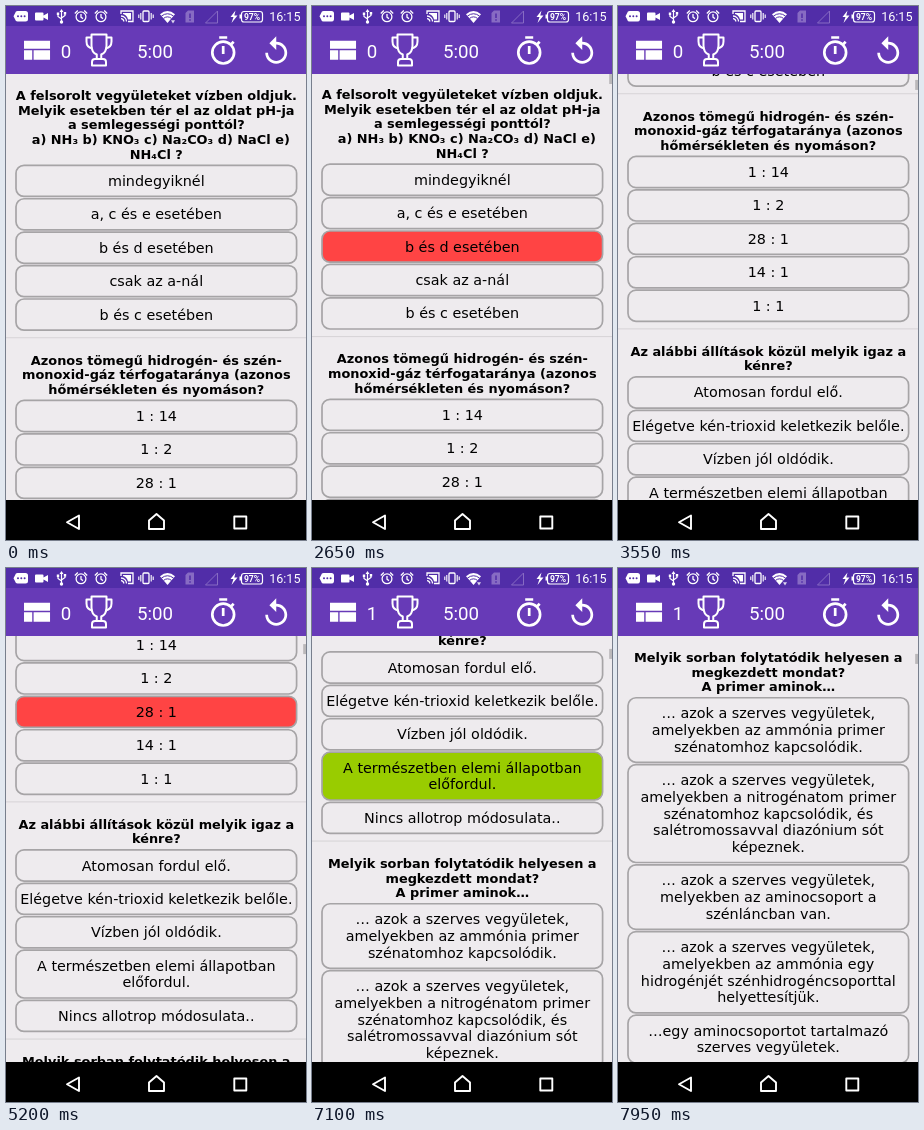
Recreate the animation shown at these times as an HTML page. Size 300 px wide and 534 px high, loop 8 s.

```html
<!DOCTYPE html>
<html lang="hu">
<head>
<meta charset="utf-8">
<title>Kémia kvíz</title>
<style>
  html, body { margin: 0; width: 100%; height: 100%; overflow: hidden; background: #000; }
  svg { display: block; width: 100%; height: 100%; }
  .title { font: bold 12.9px "DejaVu Sans", sans-serif; text-anchor: middle; }
  .answer { font: 14.35px "DejaVu Sans", sans-serif; text-anchor: middle; }
  .box { stroke: #a6a4a6; stroke-width: 1.7; }
  .bar { font-family: Roboto, sans-serif; fill: #fff; }
  .line { fill: none; stroke: #fff; }
</style>
</head>
<body>
<svg viewBox="0 0 300 534">
  <defs>
    <clipPath id="view"><rect y="68" width="300" height="426"/></clipPath>
    <g id="alarm" class="line" stroke-width="1.3">
      <circle r="4.9"/>
      <path d="M0 -2.8V.4L2 1.8M-6.2 -3.4L-3.2 -6.2M6.2 -3.4L3.2 -6.2"/>
    </g>
  </defs>

  <rect y="68" width="300" height="426" fill="#eeebee"/>
  <g clip-path="url(#view)">
    <g id="list"></g>
    <rect id="thumb" x="297.2" width="2.8" height="10" fill="#000"/>
  </g>

  <rect width="300" height="21" fill="#512da8"/>
  <rect y="20" width="300" height="48" fill="#673ab7"/>
  <rect y="494" width="300" height="40"/>

  <!-- status bar -->
  <path d="M11.500 5h8q2.500 0 2.500 2.500v5.500q0 2.500-2.500 2.500h-8q-2 0-2.300-2l-1.700-3.250 1.700-3.250q.300-2 2.300-2z" fill="#fff"/>
  <g fill="#512da8"><circle cx="12" cy="10.300" r="1"/><circle cx="15.300" cy="10.300" r="1"/><circle cx="18.600" cy="10.300" r="1"/></g>
  <path d="M30 6.500h6.500q1 0 1 1v2l4.500-2.500v7l-4.500-2.500v2q0 1-1 1H30q-1 0-1-1v-6q0-1 1-1z" fill="#fff"/>
  <g class="line" stroke-width="1.2"><path d="M55.500 5v11M52 8v2.500l3.500 2.500M59 7.500v2l-3.500 2.500"/></g>
  <path d="M55.500 3l2 3h-4zM50.800 6.500h2.400v2.400h-2.400zM57.800 6h2.400v2.400h-2.400z" fill="#fff"/>
  <circle cx="55.500" cy="16" r="1.700" fill="#fff"/>
  <use href="#alarm" x="75" y="10.800"/>
  <use href="#alarm" x="95" y="10.800"/>
  <g class="line" stroke-width="1.3">
    <path d="M115 8V5h12v10.500h-5M115 10a5.500 5.500 0 0 1 5.500 5.500M115 12.700a2.800 2.800 0 0 1 2.800 2.800"/>
    <path d="M117 7h8v6.500h-3q-1-4.500-5-5.500z" fill="#fff" stroke="none"/>
    <rect x="137" y="5" width="6" height="10.500" rx="1"/>
    <path d="M134.800 7v6.500M145.200 7v6.500M132.800 8.500v3.500M147.200 8.500v3.500" stroke-width="1.100"/>
  </g>
  <path d="M154 8.200Q161.500 1.800 169 8.200L161.500 17z" fill="#fff"/>
  <path d="M155.500 10Q161.500 5.500 167.500 10M157.500 12.400Q161.500 9.300 165.500 12.400" class="line" style="stroke:#512da8" stroke-width="1"/>
  <path id="data" d="M165 14.200h4l-2 3.300z" fill="#fff"/>
  <path d="M182 4.500h6v12h-8.500V7z" fill="#876bc3"/>
  <path d="M184 7.500v4.500M184 13.300v1.500" stroke="#512da8" stroke-width="1.500"/>
  <path d="M211.500 5v12h-12z" fill="none" stroke="#876bc3"/>
  <path d="M229.500 4.500l-5 6.500h3l-2 6 6-7.500h-3.200z" fill="#fff"/>
  <rect x="235.500" y="5.500" width="21" height="10.500" rx="2.500" class="line" stroke-width="1.200"/>
  <rect x="233.500" y="8.500" width="2" height="4" fill="#fff"/>
  <text class="bar" x="246" y="13.900" font-size="8.600" font-weight="700" text-anchor="middle">97%</text>
  <text class="bar" x="294.500" y="15.200" font-size="12.600" text-anchor="end">16:15</text>

  <!-- toolbar -->
  <path transform="translate(13.900 27.800) scale(1.370)" fill="#fff" d="M3 19h6v-7H3zM10 19h12v-7H10zM3 5v6h19V5z"/>
  <text id="score" class="bar" x="60" y="51.500" font-size="18.700" text-anchor="middle">0</text>
  <g class="line" stroke-width="2" stroke-linejoin="round">
    <path d="M85.500 28.500h15v11q0 7-5.250 9v4.500h-4.500v-4.500q-5.250-2-5.250-9z"/>
    <path d="M85.500 31.500h-5v4q0 6 6 7M100.500 31.500h5v4q0 6-6 7"/>
    <path d="M86 59.500v-3.500q0-3 3-3h8q3 0 3 3v3.500z"/>
  </g>
  <text class="bar" x="149" y="51.500" font-size="18.700" text-anchor="middle">5:00</text>
  <g class="line" transform="translate(.200 -.500)">
    <circle cx="217" cy="47.100" r="10.900" stroke-width="2.700"/>
    <path d="M217 40.500v8M213 32h8M224.500 39.200l3-3" stroke-width="2.700"/>
  </g>
  <path transform="translate(253.800 29) scale(1.370)" fill="#fff" d="M12 5V1L7 6l5 5V7c3.310 0 6 2.690 6 6s-2.690 6-6 6-6-2.690-6-6H4c0 4.420 3.580 8 8 8s8-3.580 8-8-3.580-8-8-8z"/>

  <!-- navigation -->
  <g class="line" stroke-width="1.900" stroke-linejoin="round">
    <path d="M73 509.500v13.500l-12-6.750z"/>
    <path d="M143 523v-8.500l7.500-6.500 7.500 6.500v8.500z"/>
    <rect x="228.300" y="510.500" width="12" height="12"/>
  </g>
</svg>
<script>
const LOOP = 8000, STEP = 50;
const PLAIN = [238, 235, 238], RED = [255, 68, 68], GREEN = [153, 204, 0];
const TITLE_LINE = 14.7, ANSWER_LINE = 16.7;

// Lines are separated by "|"; "mark" is the answer that gets tapped.
const questions = [
  { title: "A felsorolt vegyületeket vízben oldjuk.|Melyik esetekben tér el az oldat pH-ja|a semlegességi ponttól?|\u00a0\u00a0a) NH₃ b) KNO₃ c) Na₂CO₃ d) NaCl e)|NH₄Cl ?",
    answers: ["mindegyiknél", "a, c és e esetében", "b és d esetében", "csak az a-nál", "b és c esetében"],
    mark: 2, color: RED, tap: 1850 },
  { title: "Azonos tömegű hidrogén- és szén-|monoxid-gáz térfogataránya (azonos|hőmérsékleten és nyomáson?",
    answers: ["1 : 14", "1 : 2", "28 : 1", "14 : 1", "1 : 1"],
    mark: 2, color: RED, tap: 4550 },
  { title: "Az alábbi állítások közül melyik igaz a|kénre?",
    answers: ["Atomosan fordul elő.", "Elégetve kén-trioxid keletkezik belőle.", "Vízben jól oldódik.",
      "A természetben elemi állapotban|előfordul.", "Nincs allotrop módosulata.."],
    mark: 3, color: GREEN, tap: 6450 },
  { title: "Melyik sorban folytatódik helyesen a|megkezdett mondat?|A primer aminok…",
    answers: ["… azok a szerves vegyületek,|amelyekben az ammónia primer|szénatomhoz kapcsolódik.",
      "… azok a szerves vegyületek,|amelyekben a nitrogénatom primer|szénatomhoz kapcsolódik, és|salétromossavval diazónium sót|képeznek.",
      "… azok a szerves vegyületek,|melyekben az aminocsoport a|szénláncban van.",
      "… azok a szerves vegyületek,|amelyekben az ammónia egy|hidrogénjét szénhidrogéncsoporttal|helyettesítjük.",
      "…egy aminocsoportot tartalmazó|szerves vegyületek."] }
];

const $ = id => document.getElementById(id);
const list = $("list");

function add(tag, attrs, text) {
  const node = document.createElementNS("http://www.w3.org/2000/svg", tag);
  for (const key in attrs) node.setAttribute(key, attrs[key]);
  if (text) node.textContent = text;
  return list.appendChild(node);
}

function addLines(lines, cls, y, lineHeight) {
  lines.forEach((line, i) => add("text", { class: cls, x: 150.3, y: y + i * lineHeight }, line));
}

const rgb = color => `rgb(${color.map(Math.round)})`;

let y = 94;
for (const q of questions) {
  const title = q.title.split("|");
  addLines(title, "title", y, TITLE_LINE);
  y += (title.length - 1) * TITLE_LINE + 5.4;
  q.answers.forEach((answer, i) => {
    const lines = answer.split("|");
    const pitch = (lines.length + 1) * ANSWER_LINE + 0.03;
    const box = add("rect", { class: "box", x: 10, y: y + 1.1, width: 280.6, height: pitch - 2.3, rx: 8, fill: rgb(PLAIN) });
    if (i === q.mark) q.box = box;
    addLines(lines, "answer", y + ANSWER_LINE + 5, ANSWER_LINE);
    y += pitch;
  });
  add("rect", { x: 0, y: y + 5.9, width: 300, height: 1, fill: "#d6d3d6" });
  y += 33.2;
}

const clamp = v => Math.max(0, Math.min(1, v));
const easeIn = p => u => u ** p;
const easeOut = p => u => 1 - (1 - u) ** p;

// start, end, distance, easing
const moves = [
  [2600, 3050, 92, easeIn(2)],
  [3050, 3850, 173, easeOut(2.15)],
  [5000, 5200, 68, easeIn(1.2)],
  [5250, 6100, 166, easeOut(2.2)],
  [7050, 7100, 32, easeIn(1)],
  [7100, 7950, 206, easeOut(2.5)]
];

const scrollAt = t => moves.reduce((sum, [from, to, distance, ease]) =>
  sum + distance * ease(clamp((t - from) / (to - from))), 0);

function thumbAlpha(t) {
  if (t < 2650) return 0;
  if (t < 5050) return 1 - clamp((t - 4100) / 300);
  if (t < 7100) return 1 - clamp((t - 6350) / 300);
  return 1;
}

function draw(time) {
  const t = Math.floor(time % LOOP / STEP) * STEP;
  const scroll = scrollAt(t);
  list.setAttribute("transform", `translate(0 ${-scroll})`);
  $("thumb").setAttribute("y", 68 + scroll * 0.0243);
  $("thumb").setAttribute("opacity", 0.22 * thumbAlpha(t));
  for (const q of questions) {
    if (!q.box) continue;
    const k = clamp((t - q.tap) / 150);
    q.box.setAttribute("fill", rgb(PLAIN.map((c, i) => c + (q.color[i] - c) * k)));
  }
  $("score").textContent = t < 6550 ? "0" : "1";
  $("data").setAttribute("opacity", t < 1400 || t >= 6400 ? 0.8 : 0);
}

const start = performance.now();
function tick() {
  draw(performance.now() - start);
  requestAnimationFrame(tick);
}
tick();
</script>
</body>
</html>
```
